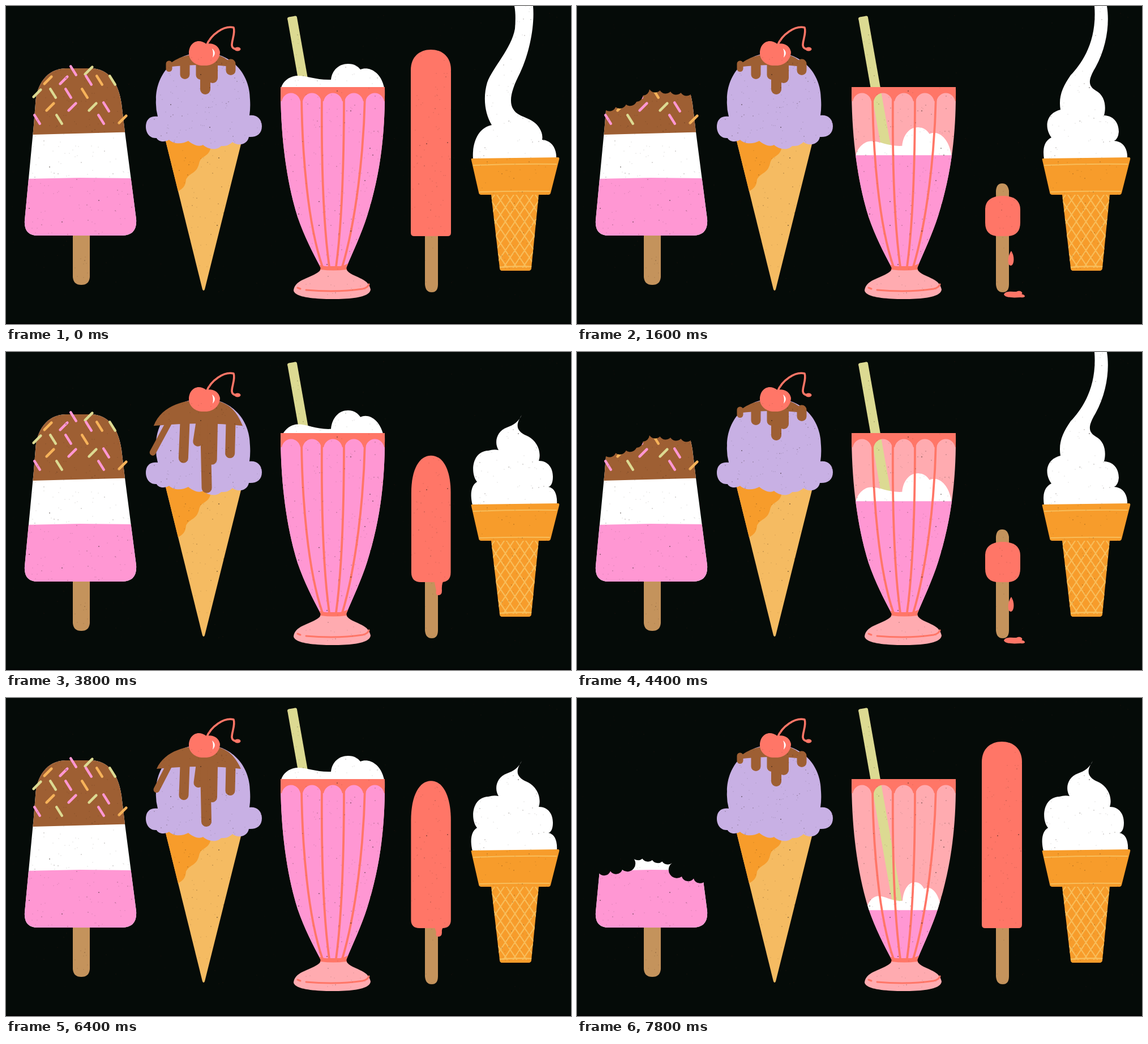
An HTML page for the animation above (8000 ms loop, 998 px wide and 561 px high).

```html
<!DOCTYPE html>
<html lang="en">
<head>
<meta charset="utf-8">
<title>Frozen treats</title>
<style>
html, body { margin: 0; width: 100%; height: 100%; overflow: hidden; background: #050b08; }
svg { display: block; width: 100vw; height: 100vh; }
.pink { fill: #ff97d3; } .white { fill: #fff; } .choc { fill: #9e5f33; } .wood { fill: #c4935c; }
.lilac { fill: #c8b0e4; } .red { fill: #ff7667; } .pale { fill: #ffabb0; } .bg { fill: #050b08; }
.wafer { fill: #f5bb62; } .orange { fill: #f79c2b; }
.line { fill: none; stroke-linecap: round; stroke-linejoin: round; }
</style>
</head>
<body>
<svg viewBox="0 0 998 561" preserveAspectRatio="none">
  <defs>
    <clipPath id="barClip"><path d="M52 172C54 138 72 111 105 110H150C182 110 199 136 204 172L210 222L230 376Q232 405 205 405H58Q31 406 33 378L49 210Z"/></clipPath>
    <clipPath id="glassClip"><path d="M470 0H690V143H669C670 230 660 300 638 370C628 402 612 435 601 462H556C542 435 527 407 515 372C495 308 485 230 485 143H470Z"/></clipPath>
    <clipPath id="coneClip"><path d="M857 333H941L928 462Q928 467 922 467H877Q872 467 872 462Z"/></clipPath>
  </defs>
  <rect class="bg" width="998" height="561"/>

  <!-- layered bar -->
  <path class="wood" d="M118 362Q118 345 133 345T148 362V478Q147 492 133 492T118 478Z"/>
  <g id="bar">
    <g clip-path="url(#barClip)">
      <rect class="white" x="30" y="100" width="205" height="310"/>
      <path class="choc" d="M30 90H230V222L47 227H30Z"/>
      <path class="pink" d="M30 305L130 303L235 304V410H30Z"/>
    </g>
    <g id="sprinkles" class="line" stroke-width="4.6"></g>
    <path id="bite" class="bg"/>
  </g>

  <!-- scoop -->
  <path class="wafer" d="M280 230L416 240L351 500Q349 504 347 500Z"/>
  <path class="orange" d="M280 230L362 245C361 268 344 262 341 278C336 297 326 292 318 306C317 320 310 323 304 327Z"/>
  <path class="lilac" d="M265 165C265 118 300 82 348 82C397 82 431 118 431 165Q432 180 430 193C441 191 452 198 452 212C452 226 442 232 429 231C426 246 408 247 400 240C391 248 386 247 380 247C372 256 355 252 348 245C340 250 328 243 322 238C311 244 296 244 288 236C278 242 268 238 266 233C254 234 247 224 247 213C247 199 256 193 268 195Q264 180 265 165Z"/>
  <path id="cap" class="choc"/>
  <g id="drips" class="line" stroke="#9e5f33"></g>
  <path class="line" stroke="#ff7667" stroke-width="3.6" d="M354 70C362 50 385 34 402 38C407 52 390 74 406 76"/>
  <ellipse class="red" cx="409" cy="76" rx="5.5" ry="3.5"/>
  <path class="red" d="M354 67C338 55 323 66 323 83C323 97 336 106 350 105C367 106 378 94 378 81C376 69 364 64 354 67Z"/>
  <path class="white" d="M364 75Q373 82 365 91Q367 82 364 75Z"/>

  <!-- milkshake -->
  <g clip-path="url(#glassClip)">
    <rect class="pale" x="480" y="143" width="195" height="325"/>
    <path id="straw" stroke="#dcda92" stroke-width="17"/>
    <path class="line" stroke="#dcda92" stroke-width="6" d="M500 22.5L511 20.5"/>
    <rect id="shake" class="pink" x="480" width="195" height="330"/>
    <path id="foam" class="white" d="M-92 1C-88 -12 -75 -20 -63 -20C-45 -20 -30 -12 -4 -13C-2 -30 10 -41 26 -41C38 -41 44 -36 48 -31C62 -37 84 -28 90 1Z"/>
    <path id="rim" class="red"/>
    <path class="line" stroke="#ff7667" stroke-width="3.8" d="M522 158C523 260 533 385 559 460M558 158C557 270 560 380 571 460M597 158C597 260 594 380 583 460M634 158C632 260 618 380 594 460"/>
    <path class="red" d="M545 453Q559 460 570 459L590 459Q600 458 610 450V470H545Z"/>
  </g>
  <path class="red" d="M556 461H601L603 469H554Z"/>
  <path class="pale" d="M556 465C545 480 510 480 508 502C510 513 540 517 577 517C615 517 643 513 644 500C640 478 612 480 601 465Q578 468 556 465Z"/>
  <path class="line" stroke="#ff7667" stroke-width="3" d="M515 497L520 499M530 501Q585 506 630 499Q639 497 641 491"/>

  <!-- ice lolly -->
  <path class="wood" d="M740 326Q741 313 751 313T763 326V491Q763 505 752 505T740 491Z"/>
  <path id="lolly" class="red"/>
  <path id="drop" class="red"/>
  <path id="puddle" class="red" d="M754 509C757 502 768 504 776 504C784 500 789 507 785 508C793 510 794 515 783 514Q757 516 754 509Z"/>

  <!-- soft serve -->
  <path id="swirl" class="white"/>
  <g clip-path="url(#coneClip)">
    <rect class="orange" x="850" y="330" width="100" height="140"/>
    <path id="lattice" class="line" stroke="#f8bd5a" stroke-width="2.2"/>
    <path class="orange" d="M850 462H950V470H850Z"/>
    <path class="line" stroke="#f8bd5a" stroke-width="2.4" d="M870 461Q900 458 932 460"/>
  </g>
  <path class="orange" d="M823 269L976 267Q978 268 977 271L962 330Q961 333 958 333H839Q835 332 835 329L822 272Q821 269 823 269Z"/>
  <path class="line" stroke="#f8bd5a" stroke-width="2" d="M826 281Q900 278 972 279M837 328Q900 326 960 327"/>

  <g id="grain" class="line" stroke="#1c120c"></g>
  <rect y="559.5" width="998" height="1.5"/>
</svg>
<script>
const STEP = 200, LOOP = 8000, CYCLE = 14;
const $ = id => document.getElementById(id);
const set = (id, value, name = 'd') => $(id).setAttribute(name, value);
const show = (id, on) => $(id).style.display = on ? '' : 'none';
const lerp = (a, b, t) => a + (b - a) * t;
const clamp = (v, lo, hi) => Math.min(hi, Math.max(lo, v));
const range = n => [...Array(n).keys()];

// Rows of sprinkles: a letter picks the colour, a capital leans right.
const colours = { p: '#ff97d3', g: '#dcda92', o: '#f7b35a' };
const rows = { 114: 'p119 G146', 131: 'O74 P102 p146 o165 g188', 154: 'G55 g83 p110 o139',
  178: 'O78 P117 G153 p177', 200: 'p55 g94 p168 O206' };
$('sprinkles').innerHTML = Object.entries(rows).map(([y, row]) => row.split(' ').map(s => {
  const lean = s[0] < 'a' ? -45 : 58;
  return `<path d="M-9 0H9" stroke="${colours[s[0].toLowerCase()]}" transform="translate(${s.slice(1)} ${y}) rotate(${lean})"/>`;
}).join('')).join('');

// Bitten edge: each stretch between key points is a run of small scallops.
const shallow = [[50, 183], [105, 169], [128, 147], [202, 155]];
const deep = [[38, 308], [80, 303], [98, 281], [168, 291], [185, 315], [227, 322]];
function biteShape(k) {
  if (k < 7) return '';
  const [edge, dy] = k < 10 ? [shallow, (k - 8) * 42] : [deep, (k - 11) * 40];
  let d = `M20 90V${edge[0][1] + dy}H${edge[0][0]}`;
  edge.slice(1).forEach(([x, y], i) => {
    const [px, py] = edge[i], n = Math.max(1, Math.round(Math.hypot(x - px, y - py) / 20));
    for (let j = 1; j <= n; j++) d += `A12 12 0 0 0 ${lerp(px, x, j / n)} ${lerp(py, y, j / n) + dy}`;
  });
  return d + 'H245V90Z';
}

// Sauce drips: [root x, tip x when long, width, short tip, long tip].
const drips = [[288, 266, 11, 116, 167], [316, 314, 17, 129, 180], [344, 340, 17, 130, 158],
  [352, 354, 18, 156, 227], [365, 364, 18, 136, 184], [397, 396, 17, 122, 172]];
function pourSauce(t) {
  const l = lerp(283, 266, t), r = lerp(405, 415, t), y = lerp(108, 125, t);
  set('cap', `M${l} ${y}C${l + 15} 92 320 84 350 84S${r - 15} 92 ${r} ${y}Q350 ${y - 8} ${l} ${y}Z`);
  $('drips').innerHTML = drips.map(([x, far, w, short, long]) =>
    `<path stroke-width="${w}" d="M${x} ${y - 6}L${lerp(x, far, t)} ${lerp(short, long, t) - w / 2}"/>`).join('');
}

// Five rounded flutes hang from the rim.
set('rim', 'M480 143H672V168H669' + range(5).map(i => {
  const r = 668 - i * 37;
  return `L${r} 168A17 19 0 0 0 ${r - 33} 168`;
}).join('') + 'H480Z');

function fillGlass(y) {
  const full = y === 143;
  const width = full ? 1 : 1 - .27 * ((y - 143) / 230) ** 2;
  set('shake', y, 'y');
  set('foam', `translate(578 ${y}) scale(${width} ${full ? 1 : 1.17})`, 'transform');
  set('straw', `M505.5 21L${505.5 + (y - 33) * .177} ${y - 12}`);
}

// The lolly shrinks from the top, faster and faster.
function lollyShape(p) {
  const top = 77 + 258 * p ** 1.9, s = 36 + 40 * Math.sin(Math.PI * p) - 12 * p;
  const inset = 6 * p ** 4, l = 715 + inset, r = 786 - inset / 2, m = (l + r) / 2;
  const b = 6 + 18 * p, low = 406, k = top + s * .35;
  return `M${l} ${low - b}V${top + s}C${l} ${k} ${m - 20} ${top} ${m} ${top}S${r} ${k} ${r} ${top + s}` +
    `V${low - b}Q${r} ${low} ${r - b} ${low}H${l + b}Q${l} ${low} ${l} ${low - b}Z`;
}
function dropShape(k) {
  if (k < 3 || k > 8) return '';
  const y = k < 6 ? 405 + (k - 2) * 8 : k < 8 ? 447 + (k - 6) * 25 : 432;
  return k < 6 ? `M756 402H774Q769 408 770 ${y - 8}Q770 ${y} 764 ${y}T760 ${y - 8}Z`
    : `M767 ${y}C774 ${y + 10} 772 ${y + 26} 766 ${y + 26}S760 ${y + 10} 767 ${y}Z`;
}

// Soft serve fills the cone twice per cycle.
const pileRight = 'C940 155 946 178 941 192C958 192 966 205 966 220C966 232 962 237 958 238C972 240 974 258 973 270';
const pileLeft = 'H824C819 250 822 235 832 229C820 215 822 175 852 174Q862 171 870 173C862 160 866 140 885 133';
const pile = `M911 111C900 128 901 138 916 146${pileRight}${pileLeft}C897 129 906 122 911 111Z`;
const swirls = [
  'M931 0C934 35 925 82 908 118C894 145 887 168 896 182C905 198 930 195 942 215Q949 226 947 236C965 237 973 253 972 270H825C823 245 832 215 858 210C846 190 842 162 850 135C860 108 893 75 899 40Q901 15 898 0Z',
  'M936 0C941 30 936 72 916 108C903 130 902 140 916 149C933 158 935 178 931 193C950 194 957 208 957 222Q956 234 949 238C966 239 973 253 972 270H825C822 250 826 238 838 232C825 215 828 189 854 183C850 160 858 142 872 122C890 103 919 65 914 0Z',
  `M924 0C930 45 900 130 916 146${pileRight}${pileLeft}C905 110 914 40 910 0Z`,
  pile, pile, pile,
  'M927 0C930 40 908 92 892 130C874 178 900 232 930 248Q968 252 971 270H826Q828 242 860 236C840 200 846 152 862 116C885 76 899 35 896 0Z'
];

set('lattice', range(17).map(i => `M${765 + i * 17} 333l86 128m12 -128l-86 128`).join(''));

// Fine dark specks across the artwork.
let seed = 7;
const rnd = () => (seed = seed * 16807 % 2147483647) / 2147483647;
$('grain').innerHTML = range(3).map(i => {
  const specks = range(1500 / 5 ** i).map(() => `M${rnd() * 998 | 0} ${rnd() * 520 | 0}h.01`).join('');
  return `<path stroke-width="${1 + i * .5}" opacity="${.3 + i * .1}" d="${specks}"/>`;
}).join('');

function draw(k) {
  show('bar', k !== 13);
  set('bite', biteShape(k));
  pourSauce(k < 7 ? (k / 4) ** 1.2 : 0);
  fillGlass(clamp(262 + 37 * (k - 8), 143, 404));
  show('lolly', k !== 10);
  set('lolly', lollyShape(k > 10 ? 0 : Math.min(k / 8, 1.06)));
  set('drop', dropShape(k));
  show('puddle', k >= 7 && k <= 10);
  set('swirl', swirls[k % 7]);
}

let last = -1;
const start = performance.now();
function tick() {
  const k = Math.floor((performance.now() - start) % LOOP / STEP) % CYCLE;
  if (k !== last) draw(last = k);
  requestAnimationFrame(tick);
}
tick();
</script>
</body>
</html>
```
